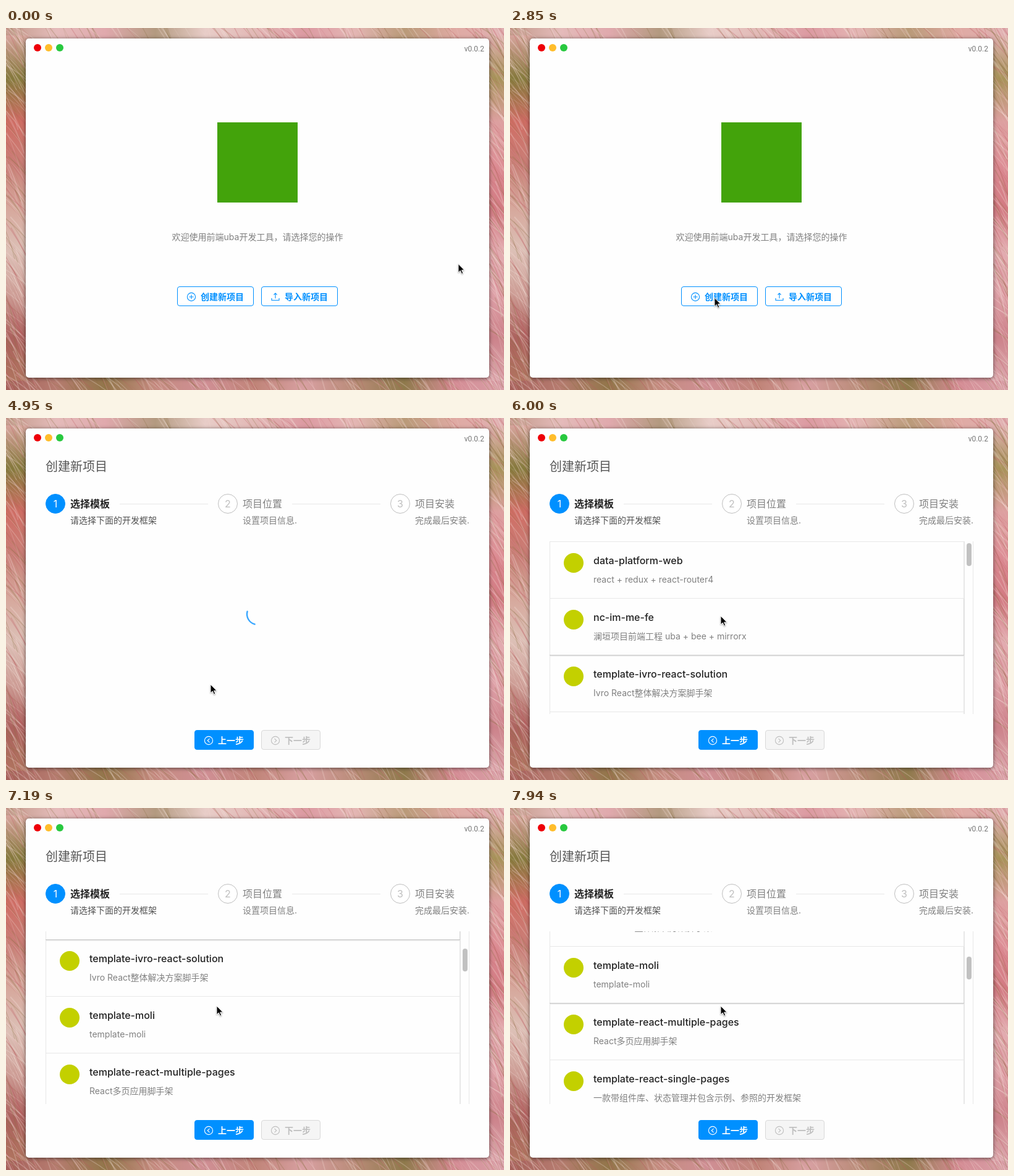
Animation, 806 px wide and 587 px high, one loop 8000 ms. Source, as an HTML page with a canvas:

```html
<!DOCTYPE html>
<html lang="zh-CN">
<head>
<meta charset="utf-8">
<title>创建新项目</title>
<style>
  html, body { margin: 0; width: 806px; height: 587px; overflow: hidden; }
  canvas, svg { position: absolute; left: 0; top: 0; }
  svg { font: 14px Inter, "Noto Sans CJK SC", "Noto Sans CJK", sans-serif; fill: #808080; }
  .window { fill: #fefefe; filter: drop-shadow(0 1px 3px rgba(0,0,0,.55)); }
  .version { font: 12px Roboto, sans-serif; text-anchor: end; fill: #777; }
  .heading { font-size: 20px; fill: #555; }
  .name { font-size: 16px; }
  .strong { fill: #222; font-weight: 500; }
  .number { font-size: 16px; text-anchor: middle; }
  .label, .current { font-weight: 600; }
  .line { fill: none; stroke: #e8e8e8; }
  .icon { fill: none; stroke: currentColor; stroke-width: 1.1; }
</style>
</head>
<body>
<canvas id="backdrop" width="806" height="587"></canvas>
<svg width="806" height="587" viewBox="0 0 806 587">
  <defs>
    <clipPath id="viewport"><rect x="64" y="200" width="686" height="280"/></clipPath>
  </defs>
  <rect class="window" x="32" y="17" width="750" height="550" rx="5"/>
  <circle cx="51" cy="32" r="6" fill="#ee0008"/>
  <circle cx="69" cy="32" r="6" fill="#ffbd2b"/>
  <circle cx="87" cy="32" r="6" fill="#28c93f"/>
  <text class="version" x="774" y="38">v0.0.2</text>

  <g id="welcome">
    <rect x="342" y="153" width="130" height="130" fill="#43a30b"/>
    <text x="407" y="344" text-anchor="middle">欢迎使用前端uba开发工具，请选择您的操作</text>
    <g id="welcomeButtons"></g>
  </g>

  <g id="wizard">
    <text class="heading" x="64" y="85.5">创建新项目</text>
    <g id="steps"></g>
    <path id="spinner" d="M17 0A17 17 0 0 1 0 17" fill="none" stroke="#38a6ff" stroke-width="2.4" stroke-linecap="round"/>
    <g id="list" clip-path="url(#viewport)">
      <g id="rows"></g>
      <path class="line" d="M735.5 200V480M749.5 200V480"/>
      <rect id="thumb" x="739" width="8" height="37" rx="4" fill="#c1c1c1"/>
    </g>
    <g id="wizardButtons"></g>
  </g>

  <path id="cursor" d="M0 0V14L3.3 11 5.6 16.2 7.8 15.2 5.6 10.2H10Z" fill="#000" stroke="#fff"
    style="filter:drop-shadow(0 1px 1px rgba(0,0,0,.35))"/>
</svg>
<script>
const $ = id => document.getElementById(id);
const ROW = 92;

// Soft pink grass behind the window
function paintBackdrop() {
  const ctx = $('backdrop').getContext('2d');
  const strip = (x, y, w, h, colors) => {
    const g = w > h ? ctx.createLinearGradient(x, 0, x + w, 0) : ctx.createLinearGradient(0, y, 0, y + h);
    colors.split(' ').forEach((c, i, all) => g.addColorStop(i / (all.length - 1), '#' + c));
    ctx.fillStyle = g;
    ctx.fillRect(x, y, w, h);
  };
  strip(0, 0, 806, 24, 'c29a8a e4bbba e0a9ad b39a80 e8cdc8 e2b9b6 dc9aa2 e4b6b4 b99a78 dfaaa3 e0b0b2');
  strip(0, 560, 806, 27, 'a5605a b67c70 92764a c48c80 d08f95 c08478 d8a0a2 b98b78 8f7a4c d48c94 d8a0a8');
  strip(0, 12, 36, 560, 'd6a49c 857a3c cf6d64 c98078 d6a89c dcc0b6 cc9c94 ac625e b0745f');
  strip(778, 12, 28, 560, 'dfb0ae a8935a dda0a0 dc8d94 d27a82 e2acb0 dea0a7 cc828a dca8ae');

  let seed = 7;
  const random = () => (seed = seed * 16807 % 2147483647) / 2147483647;
  const tones = ['#f3d9d4', '#e9bcbc', '#b9575f', '#8a7040', '#f7e8e2'];
  ctx.globalAlpha = .28;
  for (let i = 0; i < 620; i++) {
    const side = random(), along = random(), depth = random();
    const [x, y] = side < .3 ? [depth * 32, along * 587]
      : side < .55 ? [782 + depth * 24, along * 587]
      : [along * 806, side < .75 ? depth * 17 : 567 + depth * 20];
    const dx = 12 + random() * 22, dy = 18 + random() * 32;
    ctx.strokeStyle = tones[Math.floor(random() * tones.length)];
    ctx.lineWidth = .5 + random() * 1.5;
    ctx.beginPath();
    ctx.moveTo(x - dx, y - dy);
    ctx.quadraticCurveTo(x + 4, y - 4, x + dx, y + dy);
    ctx.stroke();
  }
}

const icons = {
  plus: '<circle r="6.6"/><path d="M-3.6 0H3.6M0-3.6V3.6"/>',
  upload: '<path d="M-6 2V5.5H6V2M0 2.5V-6M-2.6-3.4L0-6 2.6-3.4"/>',
  back: '<circle r="6.6"/><path d="M1.5-3.2L-1.8 0 1.5 3.2"/>',
  next: '<circle r="6.6"/><path d="M-1.5-3.2L1.8 0-1.5 3.2"/>'
};

function button(x, y, width, icon, label, color, fill, border) {
  return `<g transform="translate(${x} ${y})" style="color:${color}">
    <rect x=".5" y=".5" width="${width - 1}" height="31" rx="3.5" fill="${fill}" stroke="${border}"/>
    <g class="icon" transform="translate(23 17)">${icons[icon]}</g>
    <text class="label" x="38" y="22" fill="${color}">${label}</text></g>`;
}

function step([name, note], i) {
  const x = 64 + 279 * i, active = i === 0;
  return `<g transform="translate(${x} 123)">
    <circle cx="16" cy="16" r="15.5" fill="${active ? '#0090ff' : '#fff'}" stroke="${active ? '#0090ff' : '#bfbfbf'}"/>
    <text class="number" x="16" y="22" fill="${active ? '#fff' : '#bfbfbf'}">${i + 1}</text>
    <text class="name ${active ? 'strong current' : ''}" x="40" y="22">${name}</text>
    <text x="40" y="48" fill="${active ? '#505050' : '#808080'}">${note}</text>
    ${i < 2 ? '<path class="line" d="M120 16.5H263"/>' : ''}</g>`;
}

function row([name, note], i) {
  return `<g transform="translate(64 ${200 + ROW * i})">
    <path class="line" d="M.5 0V92M670.5 0V92M0 .5H671M0 92.5H671"/>
    <circle cx="39" cy="35" r="16" fill="#c3d000"/>
    <text class="name strong" x="71" y="37">${name}</text>
    <text x="71" y="67">${note}</text></g>`;
}

$('welcomeButtons').innerHTML =
  button(277, 419, 124, 'plus', '创建新项目', '#0090ff', '#fff', '#0090ff') +
  button(413, 419, 124, 'upload', '导入新项目', '#0090ff', '#fff', '#0090ff');
$('wizardButtons').innerHTML =
  button(305, 506, 96, 'back', '上一步', '#fff', '#0090ff', '#0090ff') +
  button(413, 506, 96, 'next', '下一步', '#bfbfbf', '#f5f5f5', '#d9d9d9');
$('steps').innerHTML = [
  ['选择模板', '请选择下面的开发框架'],
  ['项目位置', '设置项目信息.'],
  ['项目安装', '完成最后安装.']
].map(step).join('');
$('rows').innerHTML = [
  ['data-platform-web', 'react + redux + react-router4'],
  ['nc-im-me-fe', '澜垣项目前端工程 uba + bee + mirrorx'],
  ['template-ivro-react-solution', 'Ivro React整体解决方案脚手架'],
  ['template-moli', 'template-moli'],
  ['template-react-multiple-pages', 'React多页应用脚手架'],
  ['template-react-single-pages', '一款带组件库、状态管理并包含示例、参照的开发框架']
].map(row).join('') + `<g id="hover" fill="none">
  <path stroke="#c9c9c9" d="M64 .5H735"/><path stroke="#e4e4e4" d="M64 1.5H735"/>
  <path stroke="#f3f3f3" d="M65 2.5H734"/><path stroke="#d8d8d8" d="M734.5-91V0"/></g>`;

const ease = u => {
  u = Math.min(1, Math.max(0, u));
  return u * u * (3 - 2 * u);
};

// Position of the cursor's tip
function pointer(t) {
  if (t < 2400) {
    const u = ease((t - 1350) / 1050), v = 1 - u;
    return [732 * v * v + 1080 * u * v + 331 * u * u, 382.5 * v * v + 632 * u * v + 437.5 * u * u];
  }
  if (t < 4800) return [331, 437.5];
  if (t >= 6000) return [341, 321];
  const u = ease((t - 5100) / 750);
  return [331 + 10 * u, 432 - 108 * u];
}

// Scroll position after each 150 ms of the wheel gesture
const scrollStops = [15, 54, 98, 138, 171, 196, 215, 230, 242, 252];

const snap = t => {
  const start = t < 6590 ? 0 : 6590;
  return start + Math.floor((t - start) / 150) * 150;
};

function render(time) {
  const t = snap(time);
  const [x, y] = pointer(t);
  const scroll = t < 6590 ? 0 : scrollStops[(t - 6590) / 150];
  const hoverScroll = t < 7490 ? 0 : 215;
  const hovered = Math.floor((y - 200 + hoverScroll) / ROW);
  const show = (id, on) => $(id).style.display = on ? '' : 'none';
  const move = (id, value) => $(id).setAttribute('transform', value);

  show('welcome', t < 3900);
  show('wizard', t >= 3900);
  show('spinner', t < 5250);
  show('list', t >= 5250);
  move('spinner', `translate(407 318) rotate(${105 + (t - 4950) * .36})`);
  move('rows', `translate(0 ${-scroll})`);
  move('hover', `translate(0 ${200 + ROW * (hovered + 1)})`);
  move('thumb', `translate(0 ${203 + Math.round(scroll * .149)})`);
  move('cursor', `translate(${x} ${y})`);
}

paintBackdrop();
const began = performance.now();
(function tick() {
  render((performance.now() - began) % 8000);
  requestAnimationFrame(tick);
})();
</script>
</body>
</html>
```
